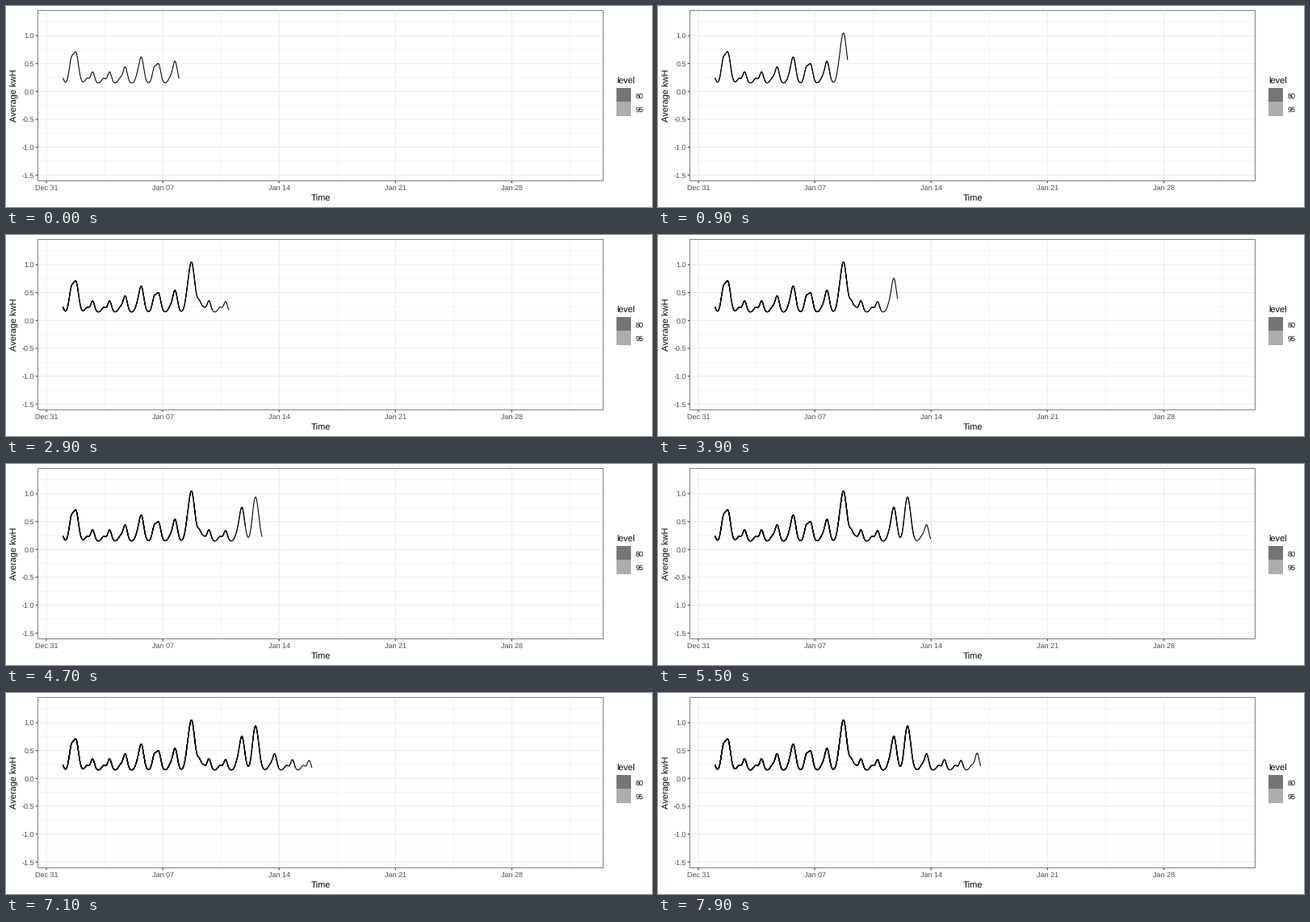
These frames come from a looping animation (800 px wide and 250 px high, 8000 ms). A matplotlib script:

```python
import numpy as np
import matplotlib.pyplot as plt
from matplotlib.animation import FuncAnimation
from matplotlib.patches import Rectangle

plt.rcParams["font.family"] = "Liberation Sans"
plt.rcParams["text.hinting"] = "none"
plt.rcParams["text.hinting_factor"] = 1

W, H, DPI = 800, 250, 100
PT = 72 / DPI                      # points per pixel
LEFT, RIGHT, TOP, BOTTOM = 39.5, 739.5, 5.5, 217.5
X0, DAY = 70.6, 20.585             # first reading, pixels per day
WEEK = 7 * DAY
HALF_HOURS = 48
FIRST = 7                          # days known at the start
STEP, LOOP = 100, 8000
BASE = 96                          # night-time load, in pixels from the top

# Peaks of demand: time in days, height in pixels
PEAKS = [(-0.1, 10), (0.5, 20), (0.78, 37), (1.78, 14), (2.8, 14),
         (3.74, 20), (4.71, 32), (5.5, 12), (5.75, 23), (6.74, 27),
         (7.73, 62), (8.2, 11), (8.78, 14), (9.78, 13), (10.76, 42),
         (11.6, 52), (12.73, 20), (13.8, 13), (14.8, 12), (15.77, 21)]

# Upper and lower reach of each day's forecast band
BANDS = [(60, 98), (55, 206), (66, 100), (16, 206), (26, 93),
         (50, 106), (61, 100), (34, 186), (70, 100)]


def bump(t, center, width):
    return np.exp(-0.5 * ((t - center) / width) ** 2)


def load(t):
    """Small daily midday rise plus peaks; higher peaks last longer."""
    rise = 6 * bump(t % 1, 0.45, 0.12)
    for when, height in PEAKS:
        rise = rise + height * bump(t, when, 0.09 + 0.0017 * height)
    return BASE - rise


def times(first, last):
    return np.arange(first * HALF_HOURS, last * HALF_HOURS) / HALF_HOURS


def forecast(day, top, bottom):
    """Mean and 95 % half-width over one day."""
    days = times(day, day + 1)
    t = days - day
    span = bottom - top
    if span > 100:
        start = load(day)
        mean = start + ((top + bottom) / 2 - start) * t
        half = span / 2 * t
    else:
        h = 0.16 * span
        low, high = bottom - 0.6 * h, top + 0.88 * h
        mean = low + (high - low) * bump(t, 0.75, 0.2)
        half = h * (0.5 + 0.5 * t)
    return X0 + DAY * days, mean, half


fig = plt.figure(figsize=(W / DPI, H / DPI), dpi=DPI, facecolor="white")
ax = fig.add_axes([0, 0, 1, 1])
ax.set_xlim(0, W)
ax.set_ylim(H, 0)
ax.axis("off")


def segment(x, y, color, width=1.07, z=2):
    ax.plot(x, y, color=color, lw=width * PT, zorder=z,
            solid_capstyle="butt", snap=False)


def label(x, y, text, size=8.8, color="#4d4d4d", **kw):
    ax.text(x, y, text, fontsize=size * PT, color=color, va="baseline", **kw)


def y_px(value):
    return 106.3 - 69.3 * value


# Grid, axes and labels
for v in np.arange(-1.25, 1.3, 0.5):
    segment([LEFT, RIGHT], [y_px(v)] * 2, "#ebebeb", 0.53, 1)
for v in np.arange(-1.5, 1.1, 0.5):
    y = y_px(v)
    segment([LEFT, RIGHT], [y, y], "#ebebeb")
    segment([LEFT - 2.75, LEFT], [y, y], "#333333")
    label(34.8, y + 3.2, f"{v:.1f}", ha="right")
for k, date in enumerate(["Dec 31", "Jan 07", "Jan 14", "Jan 21", "Jan 28"]):
    x = X0 + DAY * (7 * k - 1)
    segment([x + WEEK / 2] * 2, [TOP, BOTTOM], "#ebebeb", 0.53, 1)
    segment([x, x], [TOP, BOTTOM], "#ebebeb")
    segment([x, x], [BOTTOM, BOTTOM + 2.75], "#333333")
    label(x, 229.3, date, ha="center")
ax.add_patch(Rectangle((LEFT, TOP), RIGHT - LEFT, BOTTOM - TOP, fill=False,
                       ec="#7f7f7f", lw=PT, zorder=9, snap=False))
label(389.7, 242.5, "Time", 11, "black", ha="center")
label(14, 111.3, "Average kwH", 11, "black", rotation=90,
      rotation_mode="anchor", ha="center")

# Legend
label(756.5, 96.4, "level", 11, "black")
for y, level, shade in [(102, "80", "#757575"), (119, "95", "#adadad")]:
    ax.add_patch(Rectangle((756, y), 18, 17 + (level == "95"), fc=shade, lw=0))
    label(779.4, y + 12.8, level, color="black")

# Each step draws the whole history again, so older parts grow heavier
histories, forecasts = [], []
for n in range(FIRST, FIRST + len(BANDS) + 1):
    t = times(0, n)
    line, = ax.plot(X0 + DAY * t, load(t), color="black", lw=1.07 * PT,
                    zorder=5, solid_capstyle="butt", solid_joinstyle="round")
    histories.append(line)
for k, (top, bottom) in enumerate(BANDS):
    x, mean, half = forecast(FIRST + k, top, bottom)
    inner = half * 1.2816 / 1.96
    forecasts.append([
        ax.fill_between(x, mean - half, mean + half, color="#b8a8ff",
                        lw=0, zorder=3),
        ax.fill_between(x, mean - inner, mean + inner, color="#806fff",
                        lw=0, zorder=3.1),
        ax.plot(x, mean, color="blue", lw=1.07 * PT, zorder=4,
                solid_capstyle="butt")[0],
    ])

# Forecast and observation take turns
CHANGES = [*range(400, 3901, 500), *range(4300, 7901, 400)]


def update(frame):
    phase = sum(frame * STEP >= t for t in CHANGES)
    known, pending = divmod(phase, 2)
    for k, line in enumerate(histories):
        line.set_visible(k <= known)
    for k, parts in enumerate(forecasts):
        for part in parts:
            part.set_visible(bool(pending) and k == known)
    return []


anim = FuncAnimation(fig, update, frames=LOOP // STEP, interval=STEP,
                     repeat=True, repeat_delay=0, blit=False)
plt.show()
```
